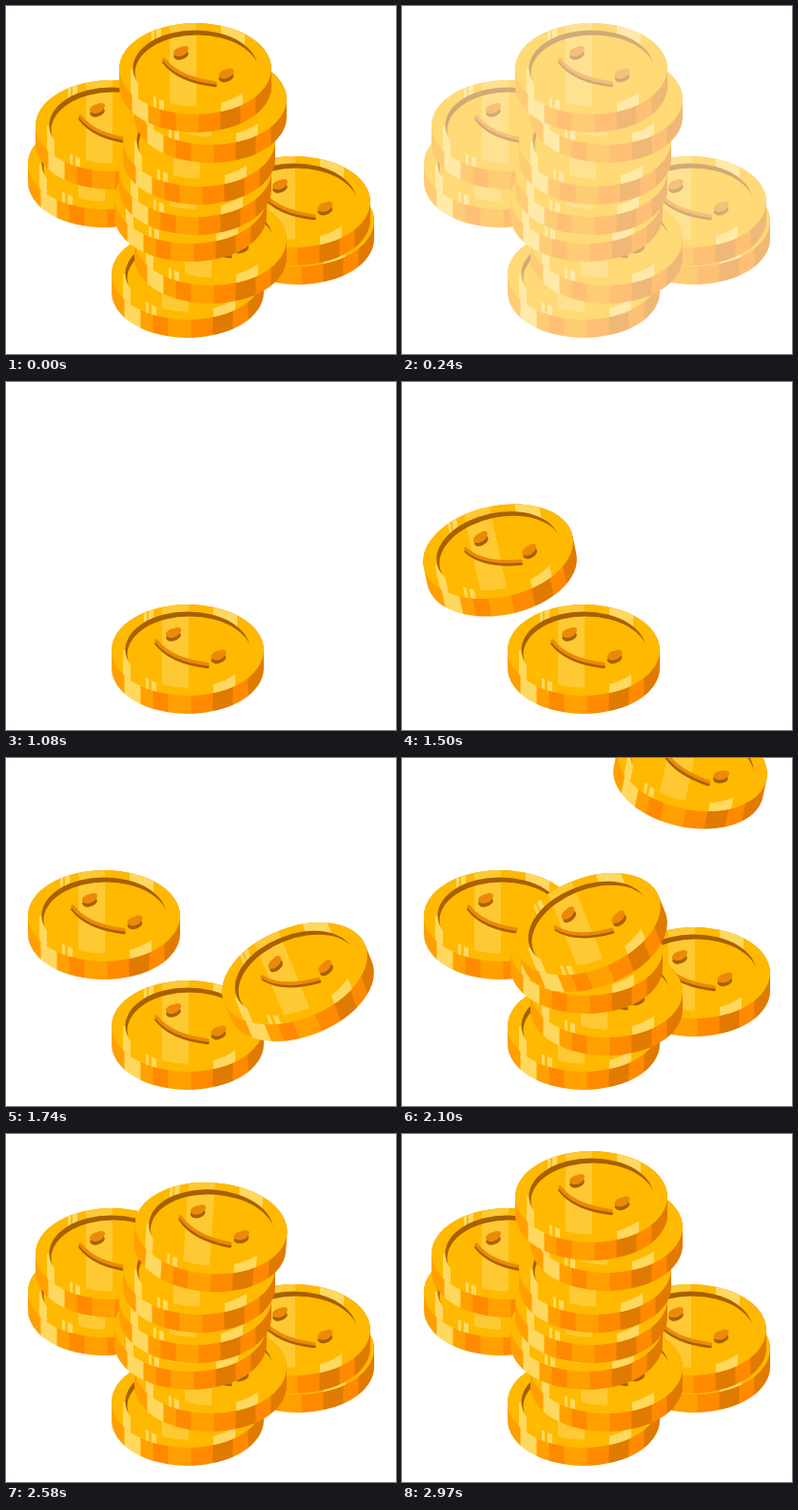
Recreate the animation shown at these times as an HTML page with a canvas. Size 410x366 px, loop 3.81 s.

```html
<!DOCTYPE html>
<html>
<head>
<meta charset="utf-8">
<title>Coin stack</title>
<style>
html, body { margin: 0; width: 100%; height: 100%; overflow: hidden; background: #fff; }
canvas { display: block; }
</style>
</head>
<body>
<canvas id="stage" width="410" height="366"></canvas>
<script>
const ctx = document.getElementById('stage').getContext('2d');
const LOOP = 3810, STEP = 30;
const RX = 80, RY = 48, THICK = 19;
const GOLD = '#ffb900', LIGHT = '#ffc933', PALE = '#ffd85f';
const AMBER = '#ffa000', ORANGE = '#ff8a00', DARK = '#e07a00';
const BROWN = '#a86000', BUMP = '#ec8a08';

// Face centre and drop time of each coin, back to front
const coins = [
  { x: 191, y: 282, start: 810 },
  { x: 103, y: 166, start: 1380 },
  { x: 111, y: 126, start: 2130 },
  { x: 307, y: 226, start: 1590 },
  { x: 303, y: 206, start: 2040 },
  { x: 215, y: 246, start: 1740 },
  { x: 194, y: 202, start: 1830 },
  { x: 199, y: 174, start: 1950 },
  { x: 203, y: 142, start: 2130 },
  { x: 215, y: 98, start: 2340 },
  { x: 199, y: 66, start: 2700 }
];

// Drop: time, vertical offset, tilt in degrees
const drop = [
  [0, -330, 16], [60, -200, 12], [90, -95, 4], [120, 12, -12],
  [150, 0, -22], [180, -3, -5], [210, 1, 9], [240, 1, 4], [270, 0, 0]
];

// Rim bands: left edge, colour
const bands = [
  [-80, AMBER], [-66, PALE], [-49, AMBER], [-36, ORANGE],
  [-20, AMBER], [4, ORANGE], [27, DARK], [48, ORANGE], [64, DARK]
];

function dropPose(u) {
  const last = drop[drop.length - 1];
  if (u >= last[0]) return { y: 0, tilt: 0 };
  const i = drop.findIndex(k => k[0] > u);
  const a = drop[i - 1], b = drop[i];
  const p = (u - a[0]) / (b[0] - a[0]);
  return { y: a[1] + (b[1] - a[1]) * p, tilt: a[2] + (b[2] - a[2]) * p };
}

function oval(x, y, rx, ry, color, turn = 0) {
  ctx.beginPath();
  ctx.ellipse(x, y, rx, ry, turn, 0, Math.PI * 2);
  if (color) {
    ctx.fillStyle = color;
    ctx.fill();
  }
}

function stripe(left, right, color, top = -RY, bottom = RY) {
  ctx.fillStyle = color;
  ctx.fillRect(left, top, right - left, bottom - top);
}

function clipped(outline, paint) {
  ctx.save();
  outline();
  ctx.clip();
  paint();
  ctx.restore();
}

function rim() {
  clipped(() => {
    ctx.beginPath();
    ctx.ellipse(0, 0, RX, RY, 0, Math.PI, 0);
    ctx.ellipse(0, THICK, RX, RY, 0, 0, Math.PI);
    ctx.closePath();
  }, () => bands.forEach(([left, color], i) => {
    const right = i + 1 < bands.length ? bands[i + 1][0] : RX + 1;
    stripe(left - 0.5, right, color, -RY, RY + THICK + 1);
  }));
}

function face() {
  clipped(() => oval(0, 0, RX, RY), () => {
    stripe(-RX, RX, GOLD);
    stripe(-27, 1, LIGHT, -RY, 0);
    stripe(-46, -43, PALE, -RY, 0);
    stripe(-41, -36, PALE, -RY, 0);
    stripe(27, 52, PALE, -RY, 0);
    stripe(-68, -60, PALE, 0);
    stripe(-44, -41, PALE, 0);
    stripe(-38, -33, PALE, 0);
    stripe(27, 50, PALE, 0);
  });
  clipped(() => oval(0, -0.5, 65.5, 40), () => {
    stripe(-RX, RX, GOLD);
    stripe(-27, 1, LIGHT);
    oval(2, 4.5, 65.5, 40);
    ctx.rect(-RX, -RY, RX * 2, RY * 2);
    ctx.fillStyle = BROWN;
    ctx.fill('evenodd');
  });
}

function eye(x, y) {
  oval(x, y + 2.5, 8, 4.8, BROWN, -0.3);
  oval(x - 0.5, y - 1, 7.8, 4.6, BUMP, -0.3);
  oval(x + 4, y - 4, 4, 3, BUMP);
}

function smile(dy, color) {
  ctx.beginPath();
  ctx.moveTo(-33, -9 + dy);
  ctx.quadraticCurveTo(-18, 11 + dy, 21, 15.5 + dy);
  ctx.strokeStyle = color;
  ctx.stroke();
}

function drawCoin({ x, y }, pose) {
  ctx.save();
  ctx.translate(x, y + THICK / 2 + pose.y);
  ctx.rotate(pose.tilt * Math.PI / 180);
  ctx.translate(0, -THICK / 2);
  rim();
  face();
  eye(-15, -17);
  eye(32.5, 6.5);
  ctx.lineWidth = 3.6;
  ctx.lineCap = 'round';
  smile(2, BROWN);
  smile(-0.8, BUMP);
  ctx.restore();
}

function render(t) {
  ctx.globalAlpha = 1;
  ctx.fillStyle = '#fff';
  ctx.fillRect(0, 0, 410, 366);
  const leaving = t < 450;
  if (!leaving && t < 810) return;
  for (const coin of coins) {
    if (leaving) drawCoin(coin, { y: 0, tilt: 0 });
    else if (t >= coin.start) drawCoin(coin, dropPose(t - coin.start));
  }
  if (leaving && t >= 90) {
    ctx.globalAlpha = (t - 60) / 390;
    ctx.fillStyle = '#fff';
    ctx.fillRect(0, 0, 410, 366);
  }
}

const begin = performance.now();
function tick() {
  const t = (performance.now() - begin) % LOOP;
  render(Math.floor(t / STEP) * STEP);
  requestAnimationFrame(tick);
}
tick();
</script>
</body>
</html>
```
